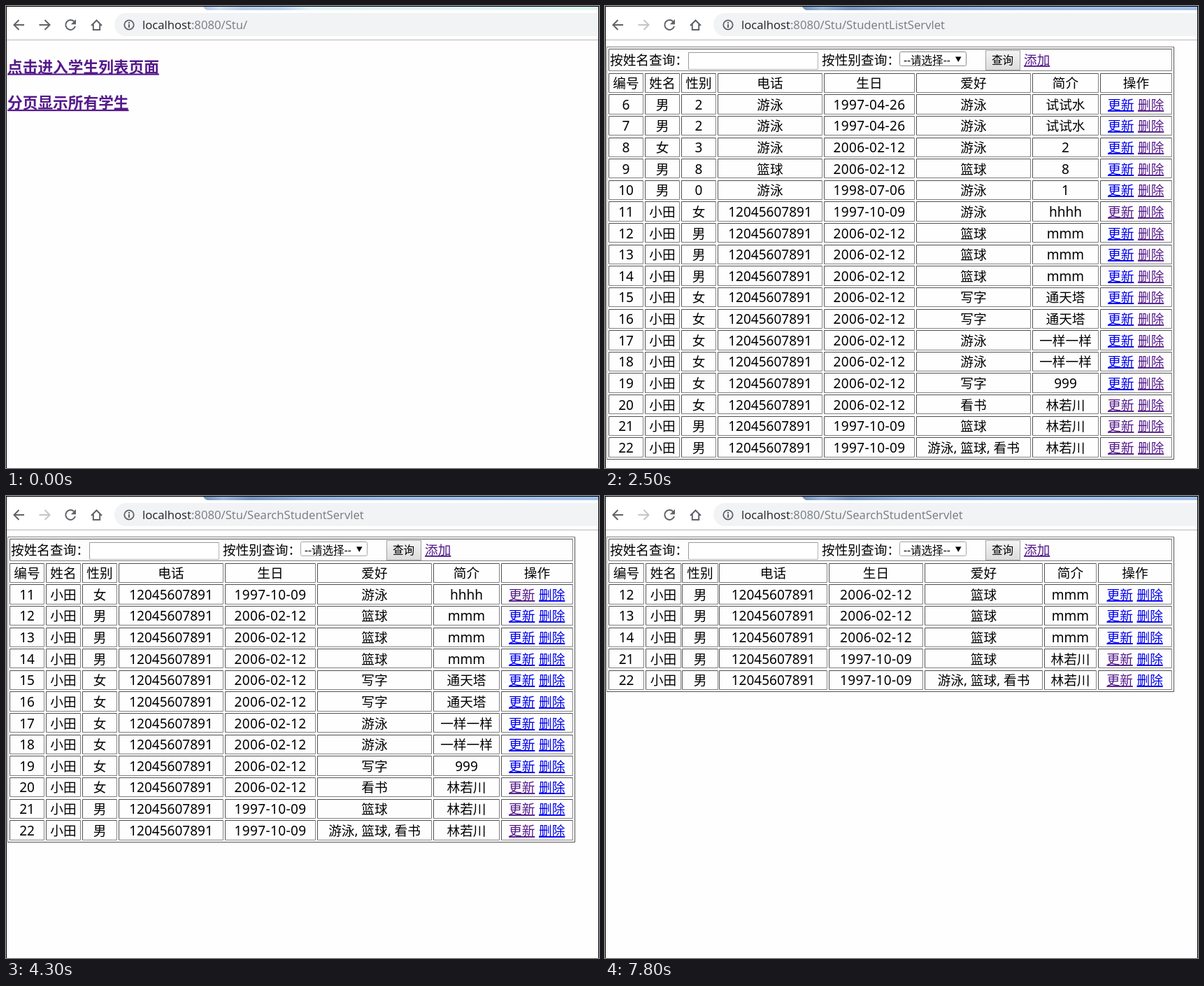
Recreate the animation shown at these times as an HTML page. Size 848 by 660 pixels, loop 8 s.

```html
<!DOCTYPE html>
<html lang="zh-CN">
<head>
<meta charset="utf-8">
<title>学生列表</title>
<style>
html, body { margin: 0; width: 100%; height: 100%; overflow: hidden; background: #fff; }
svg { display: block; width: 848px; height: 660px; }
text { font-family: "Noto Sans", "Noto Sans CJK SC", "Noto Sans CJK", sans-serif; font-size: 18.67px; white-space: pre; }
.num { font-size: 19px; }
.date { font-size: 19px; letter-spacing: .02em; }
.small { font-size: 15.56px; }
.colon { font-family: "Noto Sans CJK JP", sans-serif; }
.url { font-family: "Open Sans", "Noto Sans", sans-serif; font-size: 16.7px; }
.head { font-size: 21.7px; font-weight: 700; }
.link { fill: #0000ee; text-decoration: underline; }
.seen { fill: #551a8b; }
.icon { fill: none; stroke: #5f6368; stroke-width: 2; }
</style>
</head>
<body>
<svg id="stage" viewBox="0 0 848 660" xmlns="http://www.w3.org/2000/svg"></svg>
<script>
const LOOP = 8000;
const ROW_TOP = 126.75, ROW_STEP = 30.63, GAP = 3.27;
const DARK = '#505050', GRAY = '#808080';
const NAME = '小田', PHONE = '12045607891', STAR = '林若川';

// Column edges [left, right]
const WIDE = [[5, 55], [57, 107], [109, 159], [161, 311], [313, 443], [445, 609], [611, 706], [708, 811]];
const SLIM = [[5, 56], [58, 109], [110, 162], [163, 318], [320, 455], [457, 626], [628, 703], [705, 811]];
const HEADS = ['编号', '姓名', '性别', '电话', '生日', '爱好', '简介', '操作'];

const student = (id, sex, born, hobby, note) => [id, NAME, sex, PHONE, born, hobby, note];
const D1 = '1997-04-26', D2 = '2006-02-12', D3 = '1997-10-09';
const STUDENTS = [
  [6, '男', 2, '游泳', D1, '游泳', '试试水'],
  [7, '男', 2, '游泳', D1, '游泳', '试试水'],
  [8, '女', 3, '游泳', D2, '游泳', 2],
  [9, '男', 8, '篮球', D2, '篮球', 8],
  [10, '男', 0, '游泳', '1998-07-06', '游泳', 1],
  student(11, '女', D3, '游泳', 'hhhh'),
  ...[12, 13, 14].map(id => student(id, '男', D2, '篮球', 'mmm')),
  ...[15, 16].map(id => student(id, '女', D2, '写字', '通天塔')),
  ...[17, 18].map(id => student(id, '女', D2, '游泳', '一样一样')),
  student(19, '女', D2, '写字', 999),
  student(20, '女', D2, '看书', STAR),
  student(21, '男', D3, '篮球', STAR),
  student(22, '男', D3, '游泳, 篮球, 看书', STAR)
];
const NAMED = STUDENTS.filter(s => s[1] === NAME);
const MALE = NAMED.filter(s => s[2] === '男');
const EDITED = [11, 20, 21, 22];

const START = {
  page: 'home', path: '', tab: 'pale', loading: false, rows: STUDENTS, cols: WIDE, delSeen: true,
  value: '', filled: false, focus: false, caret: false, history: -1, lift: 0,
  pick: '--请选择--', pickState: '', option: -1, button: ''
};
const LIST = { page: 'list', path: 'StudentListServlet', loading: false };
const FRESH = { value: '', filled: false, button: '', pick: '--请选择--', pickState: '' };

// [time, changes], added up from START
const STEPS = [
  [0, {}],
  [1200, { tab: 'blue' }],
  [1300, { loading: true }],
  [1400, LIST],
  [2500, { pickState: 'hover' }],
  [2600, { pickState: '' }],
  [3000, { focus: true, history: 0 }],
  [3200, { history: 1 }],
  [3300, { value: NAME, filled: true, lift: -1 }],
  [3500, { history: -1, caret: true, lift: 0 }],
  [3900, { caret: false, button: 'hover' }],
  [4100, { focus: false, button: 'down' }],
  [4200, { button: 'hover', loading: true }],
  [4300, { ...FRESH, loading: false, path: 'SearchStudentServlet', rows: NAMED, delSeen: false }],
  [6000, { pickState: 'hover' }],
  [6400, { pickState: 'focus', option: 0 }],
  [6700, { option: 1 }],
  [7000, { option: -1, pick: '男' }],
  [7400, { button: 'hover' }],
  [7600, { button: 'down', pickState: '' }],
  [7700, { ...FRESH, button: 'hover', rows: MALE, cols: SLIM }],
  [7800, { button: '' }]
];

const text = (x, y, str, cls = '', extra = '') => `<text x="${x}" y="${y}" class="${cls}" ${extra}>${str}</text>`;
const rect = (x, y, w, h, fill, extra = '') => `<rect x="${x}" y="${y}" width="${w}" height="${h}" fill="${fill}" ${extra}/>`;
const path = (d, extra) => `<path d="${d}" ${extra}/>`;
const label = (x, str) => text(x, 84, `${str}<tspan class="colon">：</tspan>`);

// Box with separate top-left and bottom-right edge colours
function bevel(l, t, r, b, first, second) {
  return path(`M${l} ${b}V${t}H${r}`, `fill="none" stroke="${first}"`) +
         path(`M${r} ${t}V${b}H${l}`, `fill="none" stroke="${second}"`);
}

function toolbar(s) {
  const ahead = s.page === 'home' ? '' : 'style="stroke:#c3c5c8"';
  return rect(0, 0, 848, 49, '#fff') +
    path('M282 1H848V6H289Q285 6 282 1Z', `fill="url(#${s.tab})"`) +
    path('M26 27H12M18.5 20L11.5 27L18.5 34', 'class="icon"') +
    path('M47.5 27H62M55.5 20L62.5 27L55.5 34', `class="icon" ${ahead}`) +
    (s.loading
      ? path('M86 20.5L99 33.5M99 20.5L86 33.5', 'class="icon"')
      : path('M97.3 22A7 7 0 1 0 99 29', 'class="icon"') + path('M100 19v7.2h-7.2z', 'fill="#5f6368"')) +
    path('M122 28L129.5 20.5L137 28M124.8 26V34H134.2V26', 'class="icon"') +
    rect(155, 10, 720, 33, '#f1f3f4', 'rx="16.5"') +
    '<circle cx="176" cy="27" r="6.7" class="icon" style="stroke-width:1.8"/>' +
    rect(175, 26, 2, 5, '#5f6368') + rect(175, 23, 2, 2, '#5f6368') +
    text(195, 32.5, `<tspan fill="#202124">localhost</tspan>:8080/Stu/${s.path}`, 'url', 'fill="#777b80"') +
    rect(0, 48, 848, 1, '#b8b8b8');
}

const home = () => text(2, 94.5, '点击进入学生列表页面', 'head link seen') +
  text(2, 146, '分页显示所有学生', 'head link seen');

// Row -1 is the header; the gap leads from one cell's lower line to the next cell's upper line
const snap = y => Math.floor(y) + .5;
const topLine = i => snap(ROW_TOP + ROW_STEP * i);
const lowLine = i => snap(ROW_TOP + ROW_STEP * (i + 1) - GAP);
const baseline = i => Math.round(ROW_TOP + ROW_STEP * i + 21);

function textClass(v) {
  if (/^\d+-\d+-\d+$/.test(v)) return 'date';
  return /^\w+$/.test(v) ? 'num' : '';
}

function cells(cols, i, values) {
  return cols.map(([l, r], c) => {
    const v = values[c];
    return bevel(l + .5, topLine(i), r - .5, lowLine(i), DARK, GRAY) +
      (v === undefined ? '' : text((l + r) / 2, baseline(i), v, textClass(v), 'text-anchor="middle"'));
  }).join('');
}

function table(s) {
  const last = s.cols[7];
  const mid = (last[0] + last[1]) / 2;
  let out = bevel(2.5, 58.5, 813.5, topLine(s.rows.length), GRAY, DARK) +
    bevel(5.5, 61.5, 810.5, lowLine(-2), DARK, GRAY) +
    cells(s.cols, -1, HEADS);
  s.rows.forEach((row, i) => {
    const y = baseline(i);
    out += cells(s.cols, i, row) +
      text(mid - 40.5, y, '更新', EDITED.includes(row[0]) ? 'link seen' : 'link') +
      text(mid + 2.5, y, '删除', s.delSeen ? 'link seen' : 'link');
  });
  return out;
}

function field(s) {
  let out = rect(119, 66, 186, 25, s.filled ? '#e8f0fe' : '#fff');
  if (s.filled) {
    out += bevel(119.5, 66.5, 304.5, 90.5, '#767676', '#d0d0d0') +
      bevel(120.5, 67.5, 303.5, 89.5, '#8a8a8a', '#e4e4e4');
  } else out += bevel(119.5, 66.5, 304.5, 90.5, '#999', '#b4b4b4');
  if (s.focus) out += rect(118, 66, 188, 25, 'none', 'stroke="#4d90fe" stroke-width="2" rx="1"');
  if (s.caret) out += rect(151, 69, 1, 18, '#000');
  return out + text(120, 83, s.value, 'small');
}

function picker(s) {
  const focus = s.pickState === 'focus';
  const line = focus ? '#4d90fe' : s.pickState === 'hover' ? '#8c8c8c' : '#a6a6a6';
  return rect(421.5, 65.5, 95, focus ? 21 : 20, '#fff', `rx="2" stroke="${line}" stroke-width="${focus ? 2 : 1}"`) +
    text(427, 83, s.pick, 'small') + path('M501 72.5H509.5L505.25 80Z', 'fill="#000"');
}

function button(s) {
  const fill = s.button === 'down' ? '#d4d4d4' : `url(#${s.button === 'hover' ? 'warm' : 'cool'})`;
  return rect(544.5, 63.5, 49, 28, fill, `stroke="${s.button ? '#7d7d7d' : '#a0a0a0'}"`) +
    text(553, 83, '查询', 'small');
}

function form(s) {
  return label(7, '按姓名查询') + field(s) +
    `<g transform="translate(0 ${s.lift})">` + label(310, '按性别查询') +
    picker(s) + button(s) + text(599, 84, '添加', 'link seen') + '</g>';
}

function menus(s) {
  let out = '';
  if (s.history >= 0) {
    out += rect(118.5, 92.5, 219, 180, '#fff', 'stroke="#d4d4d4" filter="url(#shade)"');
    if (s.history) out += rect(119, 102, 218, 40, '#ebebec');
    out += [NAME, '小叶', '学生', '测试'].map((v, i) => text(134, 128 + 40 * i, v, 'small')).join('');
  }
  if (s.option >= 0) {
    out += rect(421.5, 86.5, 95, 68, '#fff', 'stroke="#7a9fd8"');
    out += ['--请选择--', '男', '女'].map((v, i) => {
      const on = i === s.option;
      return (on ? rect(422, 87 + 22 * i, 94, 22, '#1e90ff') : '') +
        text(427, 104 + 22 * i, v, 'small', on ? 'fill="#fff"' : '');
    }).join('');
  }
  return out;
}

const ramp = (id, dir, stops) => `<linearGradient id="${id}" ${dir}>` +
  stops.map(([at, c]) => `<stop offset="${at}" stop-color="${c}"/>`).join('') + '</linearGradient>';
const ACROSS = 'x2="1" y2="0"', DOWN = 'x2="0" y2="1"';
const DEFS = '<defs>' +
  ramp('pale', ACROSS, [[0, '#a9c4e6'], [.04, '#d2e2f6'], [.1, '#b4cdee'], [.2, '#b9d3f0'], [.27, '#e2f6fa'], [1, '#e0f8f8']]) +
  ramp('blue', ACROSS, [[0, '#6f8fb8'], [.05, '#9cb9dc'], [.12, '#7595c0'], [.25, '#8fb0dc'], [.5, '#9dbde8'], [1, '#a3c3ec']]) +
  ramp('cool', DOWN, [[0, '#f4f4f4'], [1, '#dcdcdc']]) +
  ramp('warm', DOWN, [[0, '#fafafa'], [1, '#e4e4e4']]) +
  '<filter id="shade"><feDropShadow dx="0" dy="2" stdDeviation="2" flood-opacity=".25"/></filter></defs>';
const FRAME = path('M0 .5H848M.5 0V660M847.5 0V660', 'stroke="#000"');

let sum = START;
const views = STEPS.map(([, change]) => {
  const s = sum = { ...sum, ...change };
  const body = s.page === 'home' ? home() : table(s) + form(s) + menus(s);
  return DEFS + rect(0, 0, 848, 660, '#fefefe') + toolbar(s) + body + FRAME;
});

const stage = document.getElementById('stage');
let shown = -1;
function draw() {
  const t = performance.now() % LOOP;
  const now = STEPS.filter(([at]) => at <= t).length - 1;
  if (now !== shown) stage.innerHTML = views[shown = now];
  requestAnimationFrame(draw);
}
draw();
</script>
</body>
</html>
```
